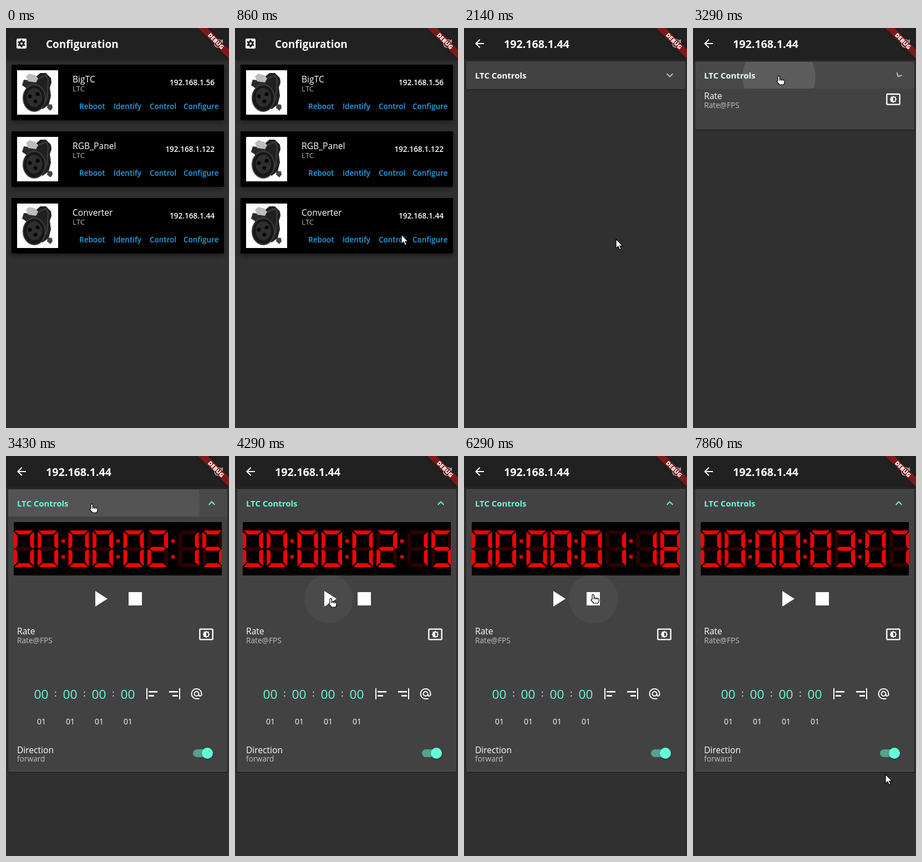
Write an HTML page that moves like this. It is 402 px wide and 720 px high and loops after 8000 ms.

```html
<!DOCTYPE html>
<html lang="en">
<head>
<meta charset="utf-8">
<title>Configuration</title>
<style>
html, body { margin: 0; width: 100%; height: 100%; overflow: hidden; background: #303030; }
svg { display: block; width: 100vw; height: 100vh; }
text { font-family: "Open Sans", "Noto Sans", sans-serif; fill: #fff; white-space: pre; }
.title { font-size: 19px; font-weight: 700; }
.name { font-size: 15.6px; font-weight: 500; }
.sub { font-size: 13.7px; font-weight: 500; fill: #c0c0c0; }
.kind { font-size: 13.3px; font-weight: 500; fill: #b3b3b3; }
.ip { font-size: 13.6px; font-weight: 600; text-anchor: end; }
.title.ip { font-size: 19.7px; font-weight: 700; text-anchor: start; }
.act { font-size: 13.5px; font-weight: 600; fill: #25a2e8; }
.head { font-size: 14.9px; font-weight: 700; }
.big { font-size: 22.7px; fill: #64ffda; text-anchor: middle; }
.mid { font-size: 16px; text-anchor: middle; }
.small { font-size: 13.9px; font-weight: 500; text-anchor: middle; }
.debug { font-size: 10.4px; font-weight: 800; text-anchor: middle; }
.bar { fill: #212121; filter: drop-shadow(0 2px 3px rgba(0,0,0,.4)); }
.card { filter: drop-shadow(0 4px 4px rgba(0,0,0,.4)); }
.panel { fill: #424242; filter: drop-shadow(0 1px 1.5px rgba(0,0,0,.45)); }
.cursor { fill: #fff; stroke: #000; stroke-width: 1.2; stroke-linejoin: round; }
.white { fill: #fff; }
.line { fill: none; stroke: #fff; stroke-width: 2; }
.lit { fill: #f00; }
.dim { fill: #2e0000; }
</style>
</head>
<body>
<svg id="stage" viewBox="0 0 402 720"></svg>
<script>
const FPS = 7, LOOP = 8000, FULL = 458;
const TEAL = [100, 255, 218];

const text = (cls, x, y, s) => `<text class="${cls}" x="${x}" y="${y}">${s}</text>`;
const icon = (x, y, size, body) =>
  `<g transform="translate(${x} ${y}) scale(${size / 24})">${body}</g>`;

// Home page
const connector = `
  <rect width="74" height="80" fill="#fff"/>
  <path d="M15 30L36 10 42 5 52 5 61 14 62 22 59 31 61 46 57 62 46 70 30 60z" fill="#202020"/>
  <path d="M38 15L52 9 56 17 54 50 48 62" fill="none" stroke="#3a3a3a" stroke-width="2.5"/>
  <path d="M55 61l8 1 1 6-4 5-6-5z" fill="#444"/>
  <path d="M9 27L12 17 20 18 38 20 34 27 18 33z" fill="#2a2a2a"/>
  <path d="M16 11L22 6 33 9 38 15 34 22 20 20z" fill="#bdbdbd"/>
  <ellipse cx="31" cy="50" rx="20" ry="24" fill="#171717" stroke="#3f3f3f" stroke-width="2"/>
  <ellipse cx="31" cy="49" rx="14" ry="17" fill="#2e2e2e"/>
  <g fill="#050505"><circle cx="23" cy="47" r="3.500"/><circle cx="37" cy="43" r="3.500"/><circle cx="33" cy="56" r="3.500"/></g>`;

const card = ([name, ip], i) => `<g transform="translate(0 ${i * 120})">
  <rect class="card" x="10" y="66" width="383" height="100"/>
  <g transform="translate(20 76)">${connector}</g>
  ${text('name', 120, 98, name)}${text('kind', 120, 114, 'LTC')}
  ${text('ip', 376, 103, ip)}
  ${[['Reboot', 132], ['Identify', 194], ['Control', 259], ['Configure', 320]]
    .map(([s, x]) => text('act', x, 146, s)).join('')}</g>`;

const gear = `<rect x="3" y="3" width="18" height="18" rx="2" fill="#fff"/>
  <circle cx="12" cy="12" r="5.900" fill="none" stroke="#212121" stroke-width="2.400" pathLength="12"
    stroke-dasharray="1 1" stroke-dashoffset=".5" transform="rotate(90 12 12)"/>
  <circle cx="12" cy="12" r="5.200" fill="#212121"/><circle cx="12" cy="12" r="2" fill="#fff"/>`;
const refresh = `<path fill="#ddd" opacity=".8" d="M17.65 6.35C16.2 4.9 14.21 4 12 4c-4.42 0-8 3.58-8 8s3.58 8 8 8c3.73 0 6.84-2.55 7.73-6h-2.08c-.82 2.33-3.04 4-5.65 4-3.31 0-6-2.69-6-6s2.69-6 6-6c1.66 0 3.14.69 4.22 1.78L13 11h7V4z"/>`;
const appBar = (lead, title) => `<rect class="bar" width="402" height="56"/>
  ${icon(16, 16, 24, lead)}${title}${icon(371, 16, 24, refresh)}`;

const home = appBar(gear, text('title', 72, 36, 'Configuration')) +
  [['BigTC', '192.168.1.56'], ['RGB_Panel', '192.168.1.122'], ['Converter', '192.168.1.44']]
    .map(card).join('');

// Control page
const back = '<path class="white" d="M20 11H7.83l5.59-5.59L12 4l-8 8 8 8 1.41-1.41L7.83 13H20z"/>';
const brightness = `<rect class="line" x="2" y="4" width="20" height="16" rx="1"/>
  <path class="white" fill-rule="evenodd" d="M8 16h2.5l1.5 1.5 1.5-1.5H16v-2.5l1.5-1.5-1.5-1.5V8h-2.5L12 6.5 10.5 8H8v2.5L6.5 12 8 13.5zM12 9a3 3 0 0 1 0 6z"/>`;
const alignLeft = '<path class="white" d="M2 2h2v20H2zM6 7h16v2.8H6zM6 14.2h10V17H6z"/>';
const alignRight = `<g transform="matrix(-1 0 0 1 24 0)">${alignLeft}</g>`;
const at = '<path class="line" d="M17 21h-5a9 9 0 1 1 9-9v1.4a2.5 2.5 0 0 1-5 0V12"/><circle class="line" cx="12" cy="12" r="4"/>';

// Seven segments in a 37 x 66 cell, named a to g
const SEGMENTS = {
  a: '2,0 35,0 28,7 9,7',
  b: '37,2 37,31 34,32 30,28 30,9',
  c: '37,64 37,35 34,34 30,38 30,57',
  d: '2,66 35,66 28,59 9,59',
  e: '0,64 0,35 3,34 7,38 7,57',
  f: '0,2 0,31 3,32 7,28 7,9',
  g: '4,33 8,29.5 29,29.5 33,33 29,36.5 8,36.5'
};
const LIT = ['abcdef', 'bc', 'abged', 'abgcd', 'fgbc', 'afgcd', 'afgedc', 'abc', 'abcdefg', 'abcdfg'];
const digitX = i => 13.5 + Math.floor(i / 2) * 99 + (i % 2) * 43.5;
const clockFace = [...Array(8).keys()].map(i =>
  `<g class="digit" transform="translate(${digitX(i)} 134)">` +
  Object.values(SEGMENTS).map(p => `<polygon points="${p}"/>`).join('') + '</g>').join('') +
  [103, 202, 301].map(x => `<path class="lit" d="M${x - 3} 150h6v6h-6zM${x - 3} 178.5h6v6h-6z"/>`).join('');

const fields = [64, 116, 168, 220].map((x, i) =>
  text('big', x - .5, 437, '00') + text('small', x, 483, '01') +
  (i < 3 ? text('mid', x + 25.5, 433, ':') : '')).join('');

const content = `
  <rect x="14" y="119" width="375" height="96"/>
  <g clip-path="url(#face)">${clockFace}</g>
  <circle id="playHover" cx="169" cy="257" r="44" fill="#fff"/>
  <circle id="stopHover" cx="233.5" cy="257" r="44.5" fill="#fff"/>
  ${icon(145, 233, 48, '<path class="white" d="M8 5v14l11-7z"/>')}
  ${icon(209, 233, 48, '<path class="white" d="M6 6h12v12H6z"/>')}
  ${text('name', 20, 321, 'Rate')}${text('sub', 20, 337, 'Rate@FPS')}
  ${icon(347, 307, 28, brightness)}
  ${fields}
  ${icon(251, 416, 24, alignLeft)}${icon(292, 416, 24, alignRight)}${icon(331.5, 416, 24, at)}
  ${text('name', 20, 535, 'Direction')}${text('sub', 20, 550, 'forward')}
  <rect x="337" y="528" width="34" height="14" rx="7" fill="rgba(100,255,218,.5)"/>
  <circle cx="363" cy="535" r="10" fill="#64ffda" style="filter:drop-shadow(0 1px 1px rgba(0,0,0,.4))"/>`;

const control = `<rect width="402" height="720" fill="#303030"/>
  ${appBar(back, text('title ip', 72, 36, '192.168.1.44'))}
  <rect class="panel" id="panel" x="4" y="60" width="395" rx="2"/>
  <rect id="headHover" x="4" y="61" width="395" height="48" fill="#fff"/>
  <g clip-path="url(#header)"><circle id="ripple" cx="155" cy="88" fill="#fff"/></g>
  <g id="edges" fill="#fff"><rect x="4" y="60" width="395" height="1"/><rect x="4" y="567" width="395" height="1"/></g>
  <text class="head" x="20" y="91" id="head">LTC Controls</text>
  <path id="chevron" d="M16.59 8.59L12 13.17 7.41 8.59 6 10l6 6 6-6z"/>
  <g clip-path="url(#body)"><g id="content">${content}</g></g>`;

const banner = `<g transform="translate(402 0) rotate(45)">
  <rect x="-40" y="27.2" width="80" height="12" fill="#b71c1c" fill-opacity=".63" style="filter:drop-shadow(0 0 3px rgba(0,0,0,.5))"/>
  ${text('debug', 0, 37, 'DEBUG')}</g>`;

document.getElementById('stage').innerHTML = `
  <defs>
    <clipPath id="face"><rect x="14" y="119" width="375" height="96"/></clipPath>
    <clipPath id="header"><rect x="4" y="61" width="395" height="48"/></clipPath>
    <clipPath id="body"><rect id="bodyClip" x="4" y="109" width="395"/></clipPath>
  </defs>
  <rect width="402" height="720" fill="#303030"/>
  ${home}<g id="control">${control}</g>${banner}
  <path class="cursor" id="arrow" d="M0 0V16.5l4-3.5 2.6 6 2.8-1.2-2.6-5.8H12z"/>
  <path class="cursor" id="hand" d="M3 8V2a1.7 1.7 0 0 1 3.4 0v4l6.6 1a2.2 2.2 0 0 1 2 2.2v3L13.5 16H6L1 10.5q.3-2 2-1.5zM6.4 6v3M9.3 6.6v2.6M12.2 7v2.4"/>`;

const el = id => document.getElementById(id);
const set = (id, attrs) => { for (const a in attrs) el(id).setAttribute(a, attrs[a]); };
const clamp = v => Math.min(1, Math.max(0, v));
const mix = (from, e) => `rgb(${TEAL.map(c => Math.round(from + (c - from) * e))})`;

// Pointer stops: step, x, y
const PATH = [
  [1, 392, 40], [3, 350, 190], [6, 300, 372], [8, 282, 390], [10, 274, 380], [16, 274, 380],
  [18, 205, 240], [19, 140, 140], [20, 118, 98], [21, 150, 86], [25, 150, 86], [27, 163, 190],
  [28, 168, 246], [29, 168, 256], [38, 168, 256], [41, 214, 252], [42, 228, 249], [47, 228, 249],
  [49, 272, 420], [51, 318, 634], [52, 335, 610], [54, 347, 573], [56, 347, 573]
];
function pointer(k) {
  const i = PATH.findIndex(p => p[0] > k);
  if (i < 1) return null;
  const [a, b] = [PATH[i - 1], PATH[i]];
  const p = (k - a[0]) / (b[0] - a[0]);
  return [a[1] + (b[1] - a[1]) * p, a[2] + (b[2] - a[2]) * p];
}

function drawPointer(k, open) {
  const pos = pointer(k);
  const near = (x, r) => pos && open === 1 && Math.hypot(pos[0] + 4 - x, pos[1] - 257) < r;
  const onHead = pos && k > 16 && pos[1] > 60 && pos[1] < 109;
  const onPlay = near(169, 32), onStop = near(233.5, 32);
  const hand = onHead || onPlay || onStop;
  set('arrow', { visibility: pos && !hand ? 'visible' : 'hidden' });
  set('hand', { visibility: hand ? 'visible' : 'hidden' });
  if (pos) set(hand ? 'hand' : 'arrow', { transform: `translate(${pos})` });
  set('headHover', { opacity: onHead ? .04 : 0 });
  const press = k === 31 || k === 32 ? .06 : 0;
  set('playHover', { opacity: onPlay ? .045 + press : 0 });
  set('stopHover', { opacity: onStop ? .045 : 0 });
}

// The clock holds 02:15, then restarts from zero at 25 frames a second
function drawClock(t) {
  const n = t < 4560 ? 65 : Math.floor((t - 4560) / 40);
  const pad = v => String(v).padStart(2, '0');
  const digits = '0000' + pad(Math.floor(n / 25)) + pad(n % 25);
  document.querySelectorAll('.digit').forEach((g, i) => {
    [...g.children].forEach((seg, j) => {
      seg.setAttribute('class', LIT[digits[i]].includes('abcdefg'[j]) ? 'lit' : 'dim');
    });
  });
}

function draw(k) {
  const t = k * 1000 / FPS;

  const turn = clamp((t - 1840) / 300);
  set('control', {
    opacity: turn ** 1.75,
    transform: `translate(0 ${180 * (1 - turn) ** 2.4})`,
    visibility: turn ? 'visible' : 'hidden'
  });

  const open = clamp((t - 3218) / 200) ** 1.7;
  set('panel', { height: 50 + FULL * open });
  set('bodyClip', { height: FULL * open });
  set('content', { transform: `translate(0 ${-(1 - open) * FULL / 2})` });
  set('edges', { opacity: open === 1 ? .12 : 0 });
  el('head').style.fill = mix(255, open);
  set('chevron', { fill: mix(192, open), transform: `translate(371 85) rotate(${180 * open}) translate(-12 -12)` });

  const spread = t - 3218;
  set('ripple', {
    r: Math.max(0, 66 + (spread - 68) * .9),
    opacity: spread > 0 ? .11 * clamp(1 - (spread - 68) / 300) : 0
  });

  drawClock(t);
  drawPointer(k, open);
}

let last = -1;
function tick(now) {
  const k = Math.floor(((now % LOOP) + 5) * FPS / 1000) % (LOOP * FPS / 1000);
  if (k !== last) draw(last = k);
  requestAnimationFrame(tick);
}
draw(0);
requestAnimationFrame(tick);
</script>
</body>
</html>
```
